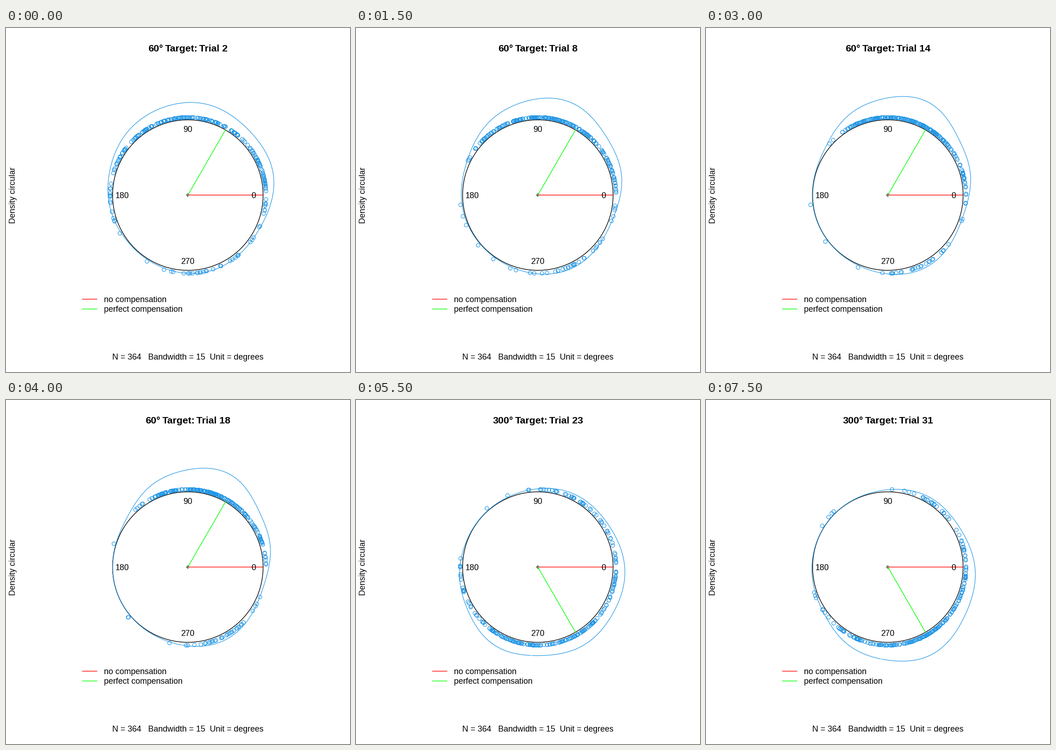
Recreate the animation shown at these times as a matplotlib script. Size 748 px wide and 748 px high, loop 8 s.

```python
import numpy as np
import matplotlib.pyplot as plt
from matplotlib.animation import FuncAnimation

SIZE, DPI = 748, 100
FRAMES, INTERVAL = 16, 500
SWITCH = 10                      # first frame of the 300 degree block
CX, CY, R, R_DOTS = 395.4, 363.3, 163.6, 169.6
DOTS, STRAYS = 238, 8            # valid responses, and those spread all round
KERNEL = 14.8                    # spread in degrees that smoothing adds
BASE = 0.4
BLUE, RED, GREEN = "#2297E6", "#FF0000", "#00FF00"
PX = 72 / DPI
TEXT, TITLE = 17.85, 21.4        # font sizes in pixels

# Each bump of the density: centre (deg), spread (deg), height (px),
# at the first and the settled state of a block.
EARLY_60 = [(75, 25, 29), (125, 30, 25), (18, 25, 26), (290, 28, 8), (185, 18, 5)]
LATE_60 = [(67, 22, 55), (109, 19, 26), (18, 18, 18), (298, 25, 14), (185, 18, 0)]
EARLY_300 = [(300, 24, 20), (240, 24, 32), (355, 26, 23), (62, 27, 13), (190, 18, 9)]
LATE_300 = [(295, 24, 45), (248, 20, 22), (352, 26, 25), (58, 22, 12), (200, 18, 2)]

plt.rcParams["font.family"] = "Liberation Sans"

fig = plt.figure(figsize=(SIZE / DPI, SIZE / DPI), dpi=DPI, facecolor="white")
ax = fig.add_axes([0, 0, 1, 1])
ax.set_xlim(0, SIZE)
ax.set_ylim(SIZE, 0)
ax.axis("off")


def polar(deg, r):
    a = np.radians(deg)
    return CX + r * np.cos(a), CY - r * np.sin(a)


def bumps(early, late, t):
    """Blend two states with an ease-out: learning is quick at first."""
    t = 1 - (1 - min(t, 1)) ** 2
    return np.array(early) * (1 - t) + np.array(late) * t


def height(deg, state):
    mu, sd, amp = state.T[:, :, None]
    d = (deg - mu + 180) % 360 - 180
    return BASE + (amp * np.exp(-0.5 * (d / sd) ** 2)).sum(axis=0)


def responses(state, seed):
    """Random angles whose smoothed density is the given state."""
    rng = np.random.default_rng(seed)
    mu, sd, amp = state.T
    share = amp * sd / (amp * sd).sum()
    pick = rng.choice(len(mu), DOTS - STRAYS, p=share)
    spread = np.sqrt(sd ** 2 - KERNEL ** 2)
    return np.append(rng.normal(mu[pick], spread[pick]),
                     rng.uniform(0, 360, STRAYS))


def label(x, y, s, size=TEXT, va="baseline", **kw):
    return ax.text(x, y, s, fontsize=size * PX, color="black", va=va, **kw)


def stroke(x, y, color, width=1.4):
    return ax.plot(x, y, color=color, lw=width * PX, snap=False,
                   solid_capstyle="round")[0]


# fixed parts
stroke(*polar(np.linspace(0, 360, 721), R), "black")
stroke([CX - 3.4, CX + 3.4], [CY, CY], "black")
stroke([CX, CX], [CY - 3.4, CY + 3.4], "black")
for deg in range(0, 360, 90):
    x, y = polar(deg, 143.2)
    label(x, y + 6.3, str(deg), ha="center")
stroke([CX, CX + R], [CY, CY], RED)

for y, color, name in ((589.6, RED, "no compensation"),
                       (611, GREEN, "perfect compensation")):
    stroke([166, 198], [y, y], color)
    label(213.4, y + 6.2, name)
label(CX - 0.4, 720.6, "N = 364   Bandwidth = 15  Unit = degrees", ha="center")
label(7.2, CY, "Density circular", rotation=90, ha="left", va="center")

# moving parts
target = stroke([], [], GREEN)
density = stroke([], [], BLUE, 1.2)
ring = ax.plot([], [], "o", ms=8 * PX, mfc="none", mec=BLUE, mew=1.15 * PX)[0]
words = [label(0, 50.8, "", TITLE, weight="bold") for _ in range(3)]
DIGIT = 0.556 * TITLE
SWEEP = 266.2 + np.arange(512) * 360 / 512   # leaves a tiny gap at its ends


def set_title(deg, num):
    parts = f"{deg}°", "Target:", f"Trial {num}"
    extra = len(str(deg)) - 2, len(str(num)) - 1
    x = CX - (172.1 + DIGIT * sum(extra)) / 2
    for word, s, step in zip(words, parts, (36.2 + DIGIT * extra[0], 74.6, 0)):
        word.set_text(s)
        word.set_x(x)
        x += step


def draw(i):
    if i < SWITCH:
        deg, num = 60, 2 + 2 * i
        state = bumps(EARLY_60, LATE_60, i / 8)
    else:
        j = i - SWITCH
        deg, num = 300, 21 + 2 * j
        state = bumps(EARLY_300, LATE_300, j / 5)
    set_title(deg, num)
    x, y = polar(deg, R)
    target.set_data([CX, x], [CY, y])
    density.set_data(*polar(SWEEP, R + height(SWEEP, state)))
    ring.set_data(*polar(responses(state, 40 + i), R_DOTS))
    return [target, density, ring, *words]


anim = FuncAnimation(fig, draw, frames=FRAMES, interval=INTERVAL,
                     repeat=True, repeat_delay=0, blit=False)
plt.show()
```
